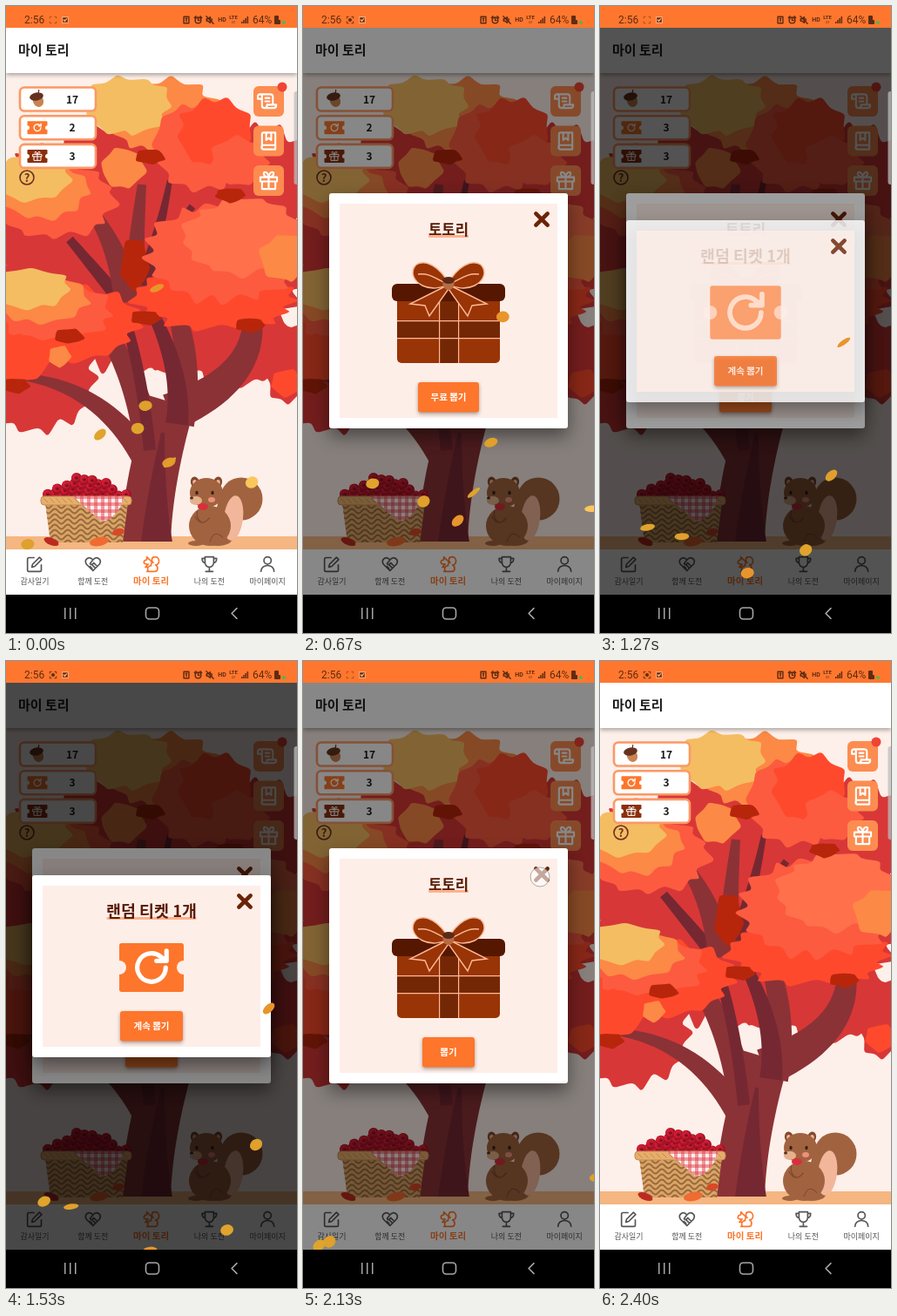
An HTML page with a canvas that plays this animation: 334x720 px, repeating every 2470 ms.

```html
<!DOCTYPE html>
<html lang="ko">
<head>
<meta charset="utf-8">
<style>
html, body { margin: 0; width: 100%; height: 100%; overflow: hidden; background: #000; }
canvas { display: block; width: 334px; height: 720px; }
</style>
</head>
<body>
<canvas id="stage" width="334" height="720"></canvas>
<script>
const W = 334, H = 720, LOOP = 2470;
const KR = '"Noto Sans CJK KR", "Noto Sans KR", "Noto Sans CJK", sans-serif';
const LATIN = 'Roboto, sans-serif';
const SKY = '#fdefe9', ORANGE = '#fd762c', INK = '#1b1b1b', PAPER = '#feeee8';
const screen = document.getElementById('stage').getContext('2d');
const backdrop = document.createElement('canvas');
backdrop.width = W;
backdrop.height = H;
let c = backdrop.getContext('2d');

const ramp = (t, a, b) => Math.min(1, Math.max(0, (t - a) / (b - a)));

let seed = 11;
const random = () => (seed = seed * 16807 % 2147483647) / 2147483647;

function rect(x, y, w, h, fill, r = 0, stroke, width = 1) {
  c.beginPath();
  c.roundRect(x, y, w, h, r);
  if (fill) { c.fillStyle = fill; c.fill(); }
  if (stroke) { c.strokeStyle = stroke; c.lineWidth = width; c.stroke(); }
}

function oval(x, y, rx, ry, fill, angle = 0) {
  c.beginPath();
  c.ellipse(x, y, rx, ry, angle, 0, 7);
  c.fillStyle = fill;
  c.fill();
}

// Path on a 24-unit grid, centred on x, y.
function icon(path, x, y, size, color, width = 2, fill) {
  c.save();
  c.translate(x - size / 2, y - size / 2);
  c.scale(size / 24, size / 24);
  c.lineCap = c.lineJoin = 'round';
  const shape = new Path2D(path);
  if (fill) { c.fillStyle = fill; c.fill(shape); }
  c.strokeStyle = color;
  c.lineWidth = width;
  c.stroke(shape);
  c.restore();
}

function text(s, x, y, size, color, weight = 400, align = 'center', family = KR) {
  c.font = `${weight} ${size}px ${family}`;
  c.textAlign = align;
  c.fillStyle = color;
  c.fillText(s, x, y);
}

function shadowed(draw, blur, dy, alpha) {
  c.save();
  c.shadowColor = `rgba(0,0,0,${alpha})`;
  c.shadowBlur = blur;
  c.shadowOffsetY = dy;
  draw();
  c.restore();
}

const ICON = {
  scroll: 'M7 20h11a3 3 0 0 0 3-3v-1H10v1a3 3 0 0 1-6 0V6a2.5 2.5 0 0 0-5 0v3h5M1 3.5h13a3 3 0 0 1 3 3V16M8 8h5M8 12h5',
  book: 'M4 20V4a2 2 0 0 1 2-2h14v20H6a2 2 0 0 1 0-5h14M9 2v9l3-2.5 3 2.5V2',
  gift: 'M2 8h20v5H2zM4 13v9h16v-9M12 8v14M12 8C5 8 5 1 8 2c3 0 4 6 4 6s1-6 4-6c3-1 3 6-4 6',
  edit: 'M11 3H4a2 2 0 0 0-2 2v15a2 2 0 0 0 2 2h15a2 2 0 0 0 2-2v-7M18.5 2.5l3 3L12 15l-4 1 1-4z',
  heart: 'M12 21L3 12C-1 5 7 0 12 6c5-6 13-1 9 6zM12 6l-4 5c1 3 4 1 5-1l5 5M8 15l3 3M11 13l4 4',
  trophy: 'M6 2h12v8a6 6 0 0 1-12 0zM6 4H2c0 5 2 6 4 6M18 4h4c0 5-2 6-4 6M12 16v5M7 22h10',
  user: 'M17 7a5 5 0 1 1-10 0a5 5 0 0 1 10 0M3 22c0-11 18-11 18 0',
  squirrel: 'M2 10c0-3 2-4 4-4V2l4 4c4 2 3 6 1 8M2 10c1 2 3 2 5 2M8 12l-4 4h4M6 22h11c5 0 5-7 1-9c7 0 6-12-1-11c-5 0-5 6-2 8M8 22c-2-4 0-8 4-8',
  redo: 'M20.5 12a8.5 8.5 0 1 1-3-6.5L21 8M21 2v6h-6',
  cross: 'M4 4L20 20M20 4L4 20',
  bell: 'M5 3h14v18H5zM10 8h4M12 8v8',
  alarm: 'M20 13a8 8 0 1 1-16 0a8 8 0 0 1 16 0M12 8v5h4M2 6l4-4M18 2l4 4',
  mute: 'M3 9h4l6-5v16l-6-5H3zM2 2l20 20M17 9v6',
  check: 'M3 3h18v18H3zM7 12l4 4 6-8'
};

function ticket(x, y, w, h, color, notch, hole) {
  rect(x - w / 2, y - h / 2, w, h, color, notch / 3);
  for (const side of [-1, 1]) oval(x + side * w / 2, y, notch, notch, hole);
}

// Mass of foliage with a ragged, leafy outline.
function clump(color, x, y, rx, ry) {
  const lobes = Math.max(5, Math.round((rx + ry) / 9)), n = lobes * 2;
  const points = Array.from({ length: n }, (_, i) => {
    const a = (i + .7 * random()) / n * Math.PI * 2;
    const r = (i % 2 ? .88 : 1.05) + .14 * (random() - .5);
    return [x + rx * r * Math.cos(a), y + ry * r * Math.sin(a)];
  });
  c.beginPath();
  points.forEach(([px, py], i) => {
    const [qx, qy] = points[(i + 1) % n];
    c.lineTo(px + (qx - px) * .25, py + (qy - py) * .25);
    const [sx, sy] = points[(i + 2) % n];
    c.lineTo(qx + (px - qx) * .25, qy + (py - qy) * .25);
    c.quadraticCurveTo(qx, qy, qx + (sx - qx) * .25, qy + (sy - qy) * .25);
  });
  c.fillStyle = color;
  c.fill();
}

// Foliage that gets smaller and lighter upwards, leaning to one side.
function bough(x, y, rx, ry, lean, colors) {
  colors.forEach((color, k) => {
    const s = 1 / (1 + .28 * k);
    clump(color, x + lean * rx * .35 * k, y - ry * .3 * k, rx * s, ry * s);
  });
}

// Tapering limb along a quadratic curve.
function limb(color, x0, y0, cx, cy, x1, y1, w0, w1) {
  const left = [], right = [];
  for (let t = 0; t <= 1.001; t += .05) {
    const u = 1 - t, w = (w0 * u + w1 * t) / 2;
    const x = u * u * x0 + 2 * u * t * cx + t * t * x1;
    const y = u * u * y0 + 2 * u * t * cy + t * t * y1;
    const a = Math.atan2(u * (cy - y0) + t * (y1 - cy), u * (cx - x0) + t * (x1 - cx));
    left.push([x + w * Math.sin(a), y - w * Math.cos(a)]);
    right.unshift([x - w * Math.sin(a), y + w * Math.cos(a)]);
  }
  c.beginPath();
  for (const p of left.concat(right)) c.lineTo(...p);
  c.fillStyle = color;
  c.fill();
}

function drawTree() {
  const red = '#d83737', coral = '#fc5b40', scarlet = '#ff492c', salmon = '#ff704b';
  const amber = '#fc8945', gold = '#f4bd62', rust = '#b7260b';
  const bark = '#8b3236', shade = '#752832';

  clump(red, 165, 270, 195, 148);
  clump(red, 295, 200, 62, 62);
  clump(red, 32, 425, 72, 65);
  clump(red, 165, 380, 60, 42);
  clump(red, 265, 390, 72, 46);
  clump(red, 326, 410, 32, 48);

  limb(bark, 160, 616, 163, 545, 190, 455, 58, 54);
  limb(bark, 188, 467, 285, 430, 283, 360, 44, 22);
  limb(bark, 165, 530, 115, 438, 20, 426, 30, 8);
  limb(bark, 165, 510, 150, 420, 105, 360, 34, 18);
  limb(bark, 200, 480, 215, 410, 195, 350, 32, 20);
  limb(shade, 196, 480, 203, 425, 172, 360, 26, 14);
  limb(shade, 165, 510, 157, 430, 140, 370, 14, 12);
  limb(shade, 173, 616, 172, 560, 180, 490, 36, 4);

  limb(shade, 125, 330, 100, 300, 73, 268, 16, 10);
  limb(bark, 140, 340, 130, 280, 100, 238, 32, 14);
  limb(bark, 146, 330, 150, 260, 156, 205, 24, 10);
  limb(shade, 155, 320, 175, 270, 188, 200, 18, 6);
  limb(shade, 160, 320, 175, 280, 214, 230, 14, 8);
  clump(rust, 147, 297, 17, 32);

  bough(180, 127, 66, 44, -1.8, [amber, gold]);
  bough(224, 160, 56, 52, .8, [coral, scarlet]);
  clump(coral, 268, 178, 34, 28);
  clump(amber, 135, 186, 26, 24);
  bough(55, 224, 70, 44, -.5, [coral, amber, gold]);
  bough(68, 364, 86, 44, -.45, [scarlet, coral, amber, gold]);
  clump(scarlet, 14, 405, 38, 28);
  bough(240, 336, 96, 36, .2, [scarlet]);
  bough(250, 282, 92, 58, .75, [coral, salmon]);
  clump(amber, 320, 290, 30, 28);
  clump(amber, 62, 402, 14, 13);
  clump(scarlet, 322, 433, 18, 17);
  for (const [x, y] of [[165, 173], [257, 217], [160, 358], [280, 366], [72, 379], [10, 436]]) {
    clump(rust, x, y, 18, 9);
  }
}

function drawBasket() {
  for (let row = 0; row < 4; row++) {
    const half = 45 - row * 11;
    for (let x = -half; x <= half; x += 9) {
      const bx = 93 + x, by = 561 - row * 5.8 + Math.sin(x * 3 + row) * 1.5;
      oval(bx, by, 6, 6, '#a51226');
      oval(bx - 1, by - 1, 4.5, 4.5, '#d01d33');
      icon('M12 5v14M5 9l14 6M19 9L5 15', bx, by, 7, '#6e1020', 3);
    }
  }
  c.save();
  c.beginPath();
  c.moveTo(45, 570);
  c.lineTo(140, 570);
  c.lineTo(134, 616);
  c.lineTo(51, 616);
  c.clip();
  rect(40, 565, 105, 55, '#d9a466');
  c.strokeStyle = '#9a6a3c';
  c.lineWidth = 2;
  for (let y = 574; y < 622; y += 6) {
    c.beginPath();
    for (let x = 40; x < 145; x++) c.lineTo(x, y + 2.5 * Math.sin(x * .42));
    c.stroke();
  }
  c.restore();
  rect(40, 563, 104, 10, '#e6ad6b', 4, '#c28a50');
  for (let x = 46; x < 140; x += 7) icon('M5 5L19 19', x, 568, 8, '#c28a50', 3);
  c.save();
  c.clip(new Path2D('M77 563H136Q128 589 110 592Q92 577 77 563'));
  rect(75, 560, 65, 35, '#fff0ed');
  for (let i = 0; i < 8; i++) {
    rect(77 + i * 8, 560, 4, 35, 'rgba(226,65,75,.5)');
    rect(75, 562 + i * 8, 65, 4, 'rgba(226,65,75,.5)');
  }
  c.restore();
  oval(52, 615, 9, 4, '#bd2a21', .4);
  oval(107, 615, 11, 5, '#ef6b31', -.2);
  oval(129, 604, 7, 4, '#d74927', -.2);
}

function drawSquirrel() {
  const fur = '#a1633f', dark = '#824a30', pink = '#f2b69a';
  oval(270, 566, 24.5, 24.5, fur);
  oval(253, 588, 12, 30, fur);
  oval(261, 588, 11, 26, pink, .12);
  for (const [x, tilt] of [[217, -.3], [243, .3]]) {
    oval(x, 547, 5, 6.5, dark, tilt);
    oval(x, 548, 2.5, 4, pink, tilt);
  }
  oval(234, 597, 24, 23, fur);
  oval(230, 559, 19, 17, fur);
  oval(218, 568, 7, 5, '#e5b18c');
  for (const x of [219, 237]) oval(x, 559, 1.7, 2.2, '#35221c');
  oval(236, 567, 4, 3, '#ef8f7d');
  oval(213, 565, 2, 1.5, '#51301f');
  oval(226, 575, 6, 4, '#d7303c');
  icon('M2 10Q10 24 20 12M5 3Q3 14 12 18', 226, 588, 22, dark, 1.3);
  icon('M2 22Q8 2 20 15', 242, 608, 20, dark, 1.3);
  oval(218, 617, 9, 3, fur);
  oval(243, 617, 11, 3, fur);
}

function drawChrome() {
  shadowed(() => rect(0, 25, W, 52, '#fff'), 5, 2, .35);
  text('마이 토리', 14, 56, 15, INK, 700, 'left');
  rect(0, 624, W, 52, '#fff');
  const tabs = { edit: '감사일기', heart: '함께 도전', squirrel: '마이 토리', trophy: '나의 도전', user: '마이페이지' };
  Object.entries(tabs).forEach(([name, label], i) => {
    const x = 33 + i * 66.8, active = name === 'squirrel', color = active ? ORANGE : '#555';
    icon(ICON[name], x, 641, 20, color);
    text(label, x, 664, active ? 10.5 : 9, color, active ? 700 : 400);
  });
}

const cardY = row => 107 + row * 32.7;

function drawCards() {
  for (let row = 0; row < 3; row++) rect(16, cardY(row) - 13.5, 87, 27, '#fff', 5, '#fb9966', 2.6);
  oval(37, 109, 6, 7, '#c98352', -.4);
  oval(35, 104, 8, 4.5, '#65321f', -.2);
  icon('M12 22L15 2', 37, 99, 6, '#65321f', 5);
  ticket(36, cardY(1), 23, 15, ORANGE, 2.5, '#fff');
  icon(ICON.redo, 36, cardY(1), 11, '#fff', 3);
  ticket(36, cardY(2), 23, 15, '#8b2f0d', 2.5, '#fff');
  icon(ICON.gift, 36, cardY(2), 12, '#fff');
  drawCount('17', 0);
  drawCount('3', 2);
  rect(16, 189, 16, 16, null, 8, '#683024', 1.6);
  text('?', 24, 202, 13, '#683024', 700);
}

function drawCount(value, row) {
  text(value, 76, cardY(row) + 4.5, 12, INK, 700);
}

function sideButton(name, row, fill = '#fc8c50', color = '#fff') {
  const y = 109 + row * 45.5;
  rect(284, y - 17, 35, 35, fill, 6);
  icon(ICON[name], 301.5, y + .5, 23, color, 2.2);
}

function drawSystemBars(t) {
  rect(0, 0, W, 25, '#ff772f');
  const ink = '#5f2c13';
  text('2:56', 21, 20, 12, ink, 400, 'left', LATIN);
  const phase = t % 1.07, focused = phase > .23 && phase < 1;
  icon('M2 7V2h5M17 2h5v5M22 17v5h-5M7 22H2v-5', 54, 16, 9, ink, focused ? 2.5 : 1.3);
  if (focused) oval(54, 16, 2, 2, ink);
  icon(ICON.check, 68, 16, 9, '#ffab78', 3, ink);
  ['bell', 'alarm', 'mute'].forEach((name, i) => icon(ICON[name], 207 + i * 13.5, 16, 10, ink, 3.5));
  text('HD', 248, 18, 7, ink, 700, 'center', LATIN);
  text('LTE', 261, 15, 6, ink, 700, 'center', LATIN);
  icon('M8 5v10l-3-3M16 15V5l3 3', 261, 19, 6, ink);
  for (let i = 0; i < 4; i++) rect(270 + i * 2.2, 18 - i * 2, 1.5, 2 + i * 2, ink);
  text('64%', 283, 20, 12, ink, 400, 'left', LATIN);
  rect(308, 11, 5, 10, ink, 1);
  rect(311, 16, 4, 5, ink, 1);
  oval(319, 19, 2, 2, '#54b848');

  rect(0, 676, W, 44, '#000');
  const key = '#a6a6a6';
  for (let x = 67; x < 82; x += 6) rect(x, 691, 1.5, 13, key);
  rect(160.5, 691, 15, 13, null, 4, key, 1.6);
  icon('M17 2L7 12l10 10', 262, 697.5, 14, key, 2.8);
  rect(330.5, 98, 8, 107, 'rgba(190,188,188,.75)', 3);
}

function panel(y, h) {
  shadowed(() => rect(30, y, 274, h, '#fff', 3), 20, 9, .45);
  rect(42, y + 12, 250, h - 24, PAPER);
  icon(ICON.cross, 274, y + 30, 20, '#6b2308', 5.5);
}

function button(label, y, w) {
  shadowed(() => rect(167 - w / 2, y, w, 34.5, ORANGE, 3), 4, 2, .35);
  text(label, 167, y + 21, 10.5, '#fff', 700);
}

function heading(label, y, size, width) {
  rect(167 - width / 2, y + 7, width, 3, '#ffb18c', 1);
  text(label, 167, y + 6.5, size, '#5a1c05', 700);
}

function drawGift() {
  const box = '#983406', band = '#742704', line = '#ffb895';
  rect(108, 330, 118, 80, box, 5);
  rect(156, 338, 22, 72, band);
  rect(108, 361, 118, 20, band);
  for (const y of [361, 381]) rect(108, y, 118, 1.2, line);
  for (const x of [156, 178]) rect(x, 338, 1.2, 72, line);
  rect(102, 319, 130, 20, '#551700', 6);
  for (const side of [-1, 1]) {
    c.save();
    c.translate(167, 318);
    c.scale(side, 1);
    c.fillStyle = box;
    c.strokeStyle = line;
    c.lineWidth = 1.4;
    const tail = new Path2D('M2 3L44 24 27 26 22 38 0 7z');
    const loop = new Path2D('M0 0C10-18 26-28 37-21C45-13 40-2 30 3C20 8 8 6 0 2z');
    for (const part of [tail, loop]) { c.fill(part); c.stroke(part); }
    c.stroke(new Path2D('M3 0C13-3 20-12 35-10'));
    c.restore();
  }
  oval(167, 319, 6.5, 7, '#b96c43');
  oval(167, 315, 7, 4, '#5b2a18');
}

function touch(x, y) {
  rect(x - 11, y - 11, 22, 22, 'rgba(255,255,255,.6)', 11, 'rgba(130,130,130,.65)');
}

function dim(amount) {
  rect(0, 25, W, 651, `rgba(0,0,0,${.47 * amount})`);
}

// Start and drift in pixels per second.
const LEAVES = [
  { x: 173, y: 324, vx: 84, vy: 49 },
  { x: 160, y: 459, vx: 83, vy: 63 },
  { x: 151, y: 485, vx: 67, vy: 110 },
  { x: 187, y: 524, vx: -14, vy: 100 },
  { x: 188, y: 524, vx: -74, vy: 67 },
  { x: 108, y: 492, vx: -42, vy: 84 },
  { x: 282, y: 547, vx: 74, vy: 45 },
  { x: 25, y: 618, vx: -130, vy: 90 }
];
const LEAF_COLORS = ['#e8952c', '#dfa02c', '#e0a42c'];

function drawLeaves(t) {
  c.save();
  c.beginPath();
  c.rect(0, 77, W, 599);
  c.clip();
  LEAVES.forEach(({ x, y, vx, vy }, i) => {
    const thin = 2.5 + 4 * Math.abs(Math.sin(.3 + i * .7 + t * 2.2));
    const color = i === 6 ? '#fbc65b' : LEAF_COLORS[i % 3];
    oval(x + vx * t, y + vy * t, 10 - thin * .4, thin, color, -.4 + .35 * Math.sin(t * 3 + i));
  });
  c.restore();
}

function drawDialogs(t) {
  const first = ramp(t, .5, .62) * (1 - ramp(t, 2.2, 2.34));
  const second = ramp(t, 1.14, 1.3) * (1 - ramp(t, 1.95, 2.08));
  if (first) {
    dim(first);
    c.globalAlpha = first;
    panel(215, 270);
    heading('토토리', 256, 16.7, 46);
    drawGift();
    if (t < 1.1) button('무료 뽑기', 432, 70);
    else button('뽑기', 432, 60);
    c.globalAlpha = 1;
  }
  if (second) {
    dim(second);
    c.globalAlpha = second;
    panel(246, 209);
    button('계속 뽑기', 402, 72);
    c.globalAlpha = second * ramp(t, 1.22, 1.48);
    heading('랜덤 티켓 1개', 287, 18.4, 103);
    c.globalAlpha = second * ramp(t, 1, 1.35);
    const size = 1.1 - .1 * ramp(t, 1.27, 1.47);
    ticket(167, 352, 74 * size, 56 * size, ORANGE, 8, PAPER);
    icon(ICON.redo, 167, 352, 46 * size, '#fff', 2.7);
    c.globalAlpha = 1;
  }
}

function frame(now) {
  const t = (now % LOOP) / 1000;
  c.drawImage(backdrop, 0, 0);
  drawCount(t < 1.1 ? '2' : '3', 1);
  if (t > .33 && t < .5) sideButton('gift', 2, '#b0aaa6', '#cce9f6');
  drawDialogs(t);
  drawSystemBars(t);
  drawLeaves(t);
  if (t > 1.76 && t < 1.95) touch(277, 276);
  if (t > 2.08 && t < 2.2) touch(272, 248);
  requestAnimationFrame(frame);
}

rect(0, 0, W, H, SKY);
rect(0, 609, W, 15, '#f5b681');
drawTree();
rect(0, 615, W, 9, '#f5b681');
drawBasket();
drawSquirrel();
drawChrome();
drawCards();
['scroll', 'book', 'gift'].forEach((name, row) => sideButton(name, row));
oval(317, 93, 5.5, 5.5, '#f04435');
c = screen;
requestAnimationFrame(frame);
</script>
</body>
</html>
```
